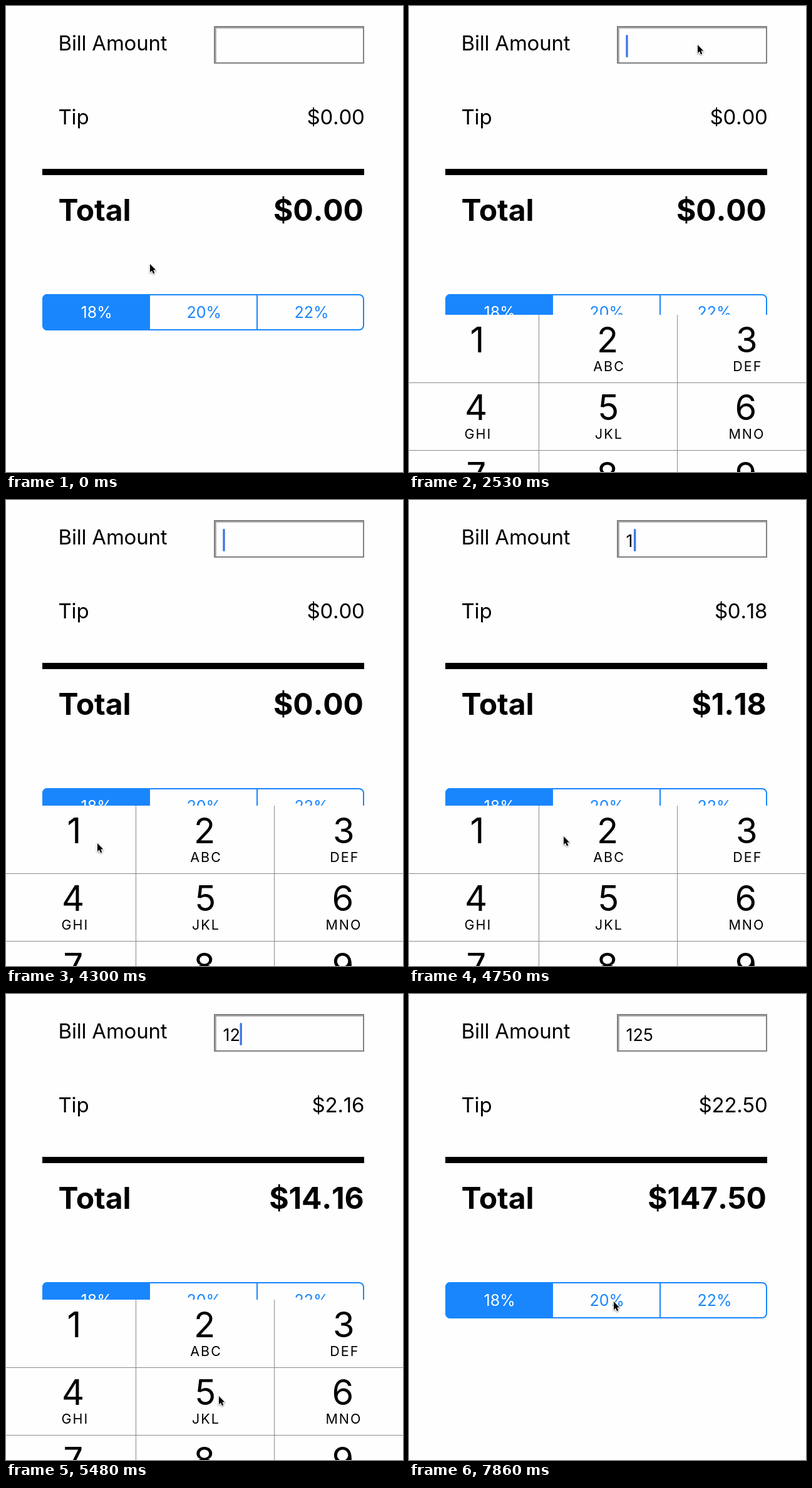
An HTML page with a canvas that plays this animation: 634x744 px, repeating every 8000 ms.

```html
<!DOCTYPE html>
<html lang="en">
<head>
<meta charset="utf-8">
<title>Tip calculator</title>
<style>
html, body { margin: 0; width: 100%; height: 100%; overflow: hidden; background: #fefefe; }
canvas { display: block; width: 634px; height: 744px; }
</style>
</head>
<body>
<canvas id="stage" width="634" height="744"></canvas>
<script>
const ctx = document.getElementById('stage').getContext('2d');
const W = 634, H = 744, LOOP = 8000, TICK = 148.3;
const BLUE = '#1986fe', PAPER = '#fefefe';
const KEY_TOP = 488, KEY_H = 108, PAD_H = 432;
const COLS = [0, 208, 429, W];

// Pointer waypoints: tick, x, y
const PATH = [
  [0, 230, 412], [2, 232, 411], [4, 232, 411], [9, 443, 68], [14, 443, 68],
  [15, 461, 62], [18, 461, 62], [20, 310, 580], [21, 310, 580], [23, 250, 591],
  [26, 146, 555], [27, 146, 555], [28, 146, 548], [31, 146, 548], [33, 347, 526],
  [34, 347, 526], [35, 340, 609], [37, 340, 642], [40, 340, 642], [41, 335, 490],
  [43, 350, 403], [48, 350, 403], [53, 327, 491]
];
const TYPED = [[39, '125'], [34, '12'], [31, '1'], [0, '']];
const PRESSED = { 30: 1, 33: 2, 38: 5 };
const CARET_ON = [[15, 19], [22, 25], [28, 42]];
const CARET_X = [346.3, 359, 373.5, 390.6];

// Digit and its centre, letters and their centre
const KEYS = [
  ['1', 107.5], ['2', 317.5, 'ABC', 318.2], ['3', 539.5, 'DEF', 540],
  ['4', 107, 'GHI', 109], ['5', 318.5, 'JKL', 318.8], ['6', 538, 'MNO', 538.7],
  ['7', 107], ['8', 317], ['9', 538]
];

function rect(x, y, w, h, color) {
  ctx.fillStyle = color;
  ctx.fillRect(x, y, w, h);
}

// Places text by its inked edges: side 0 = left, 0.5 = centre, 1 = right
function text(str, x, y, size, { side = 0, weight = 400, gap = 0, color = '#000', kern = 'normal' } = {}) {
  ctx.font = `${weight} ${size}px Inter, "Open Sans", sans-serif`;
  ctx.letterSpacing = gap + 'px';
  ctx.fontKerning = kern;
  ctx.fillStyle = color;
  const m = ctx.measureText(str);
  const left = -m.actualBoundingBoxLeft, right = m.actualBoundingBoxRight;
  ctx.fillText(str, x - left - (right - left) * side, y);
}

function money(amount, x, y, size, weight) {
  text('$' + amount.toFixed(2), x, y, size, { side: 1, weight, gap: -0.2, kern: 'none' });
}

function pointerAt(k) {
  const i = Math.max(1, PATH.findIndex(p => p[0] >= k));
  const [t0, x0, y0] = PATH[i - 1], [t1, x1, y1] = PATH[i];
  const u = (k - t0) / (t1 - t0), e = u * u * (3 - 2 * u);
  return [x0 + (x1 - x0) * e, y0 + (y1 - y0) * e];
}

// Remaining distance of a critically damped spring
function spring(sec) {
  const u = 18.26 * Math.max(0, sec);
  return (1 + u) * Math.exp(-u);
}

function padTop(k) {
  const sec = k * TICK / 1000;
  const hidden = sec < 6.6 ? spring(sec - 2.165) : 1 - spring(sec - 6.6);
  return Math.round(KEY_TOP + PAD_H * hidden);
}

function drawForm(k, value) {
  const bill = Number(value), tip = bill * 0.18;
  text('Bill Amount', 85.5, 71, 33, { gap: -0.2 });
  text('Tip', 84.5, 189, 33, { gap: -0.2 });
  money(tip, 571, 189, 33, 400);

  rect(332, 32, 240, 60, '#808080');
  rect(334, 34, 236, 56, '#acacac');
  rect(336, 36, 234, 54, PAPER);
  text(value, 347.5, 75, 27);
  if (k < 45 && CARET_ON.some(([a, b]) => k >= a && k < b)) {
    ctx.fillStyle = '#4178e6';
    ctx.beginPath();
    ctx.roundRect(CARET_X[value.length], 46, 3.4, 36, 1.5);
    ctx.fill();
  }

  rect(58, 260, 514, 10, '#000');
  text('Total', 84.5, 343, 48, { weight: 700, gap: -0.1 });
  money(bill + tip, 569.5, 343, 48, 700);
}

function drawSegments() {
  ctx.save();
  ctx.beginPath();
  ctx.roundRect(58, 460, 514, 58, 8);
  ctx.clip();
  rect(58, 460, 172, 58, BLUE);
  rect(400, 460, 2, 58, BLUE);
  ctx.restore();
  ctx.strokeStyle = BLUE;
  ctx.lineWidth = 2;
  ctx.beginPath();
  ctx.roundRect(59, 461, 512, 56, 7);
  ctx.stroke();
  ['18%', '20%', '22%'].forEach((s, i) =>
    text(s, 143.9 + i * 171.7, 498, 25, { side: 0.5, color: i ? BLUE : '#fff' }));
}

function drawPad(k) {
  const top = padTop(k);
  if (top >= H) return;
  rect(0, top, W, H - top, PAPER);
  const down = PRESSED[k];
  if (down) {
    const c = (down - 1) % 3, r = Math.floor((down - 1) / 3);
    rect(COLS[c], top + r * KEY_H, COLS[c + 1] - COLS[c] - 1, KEY_H, '#d0d4da');
  }
  const line = '#8c8c8c';
  rect(207, top, 1, H - top, line);
  rect(428, top, 1, H - top, line);
  rect(0, top + KEY_H, W, 1, line);
  rect(0, top + 2 * KEY_H, W, 1, line);
  KEYS.forEach(([digit, x, letters, lx], i) => {
    const y = top + Math.floor(i / 3) * KEY_H;
    text(digit, x, y + 60, 56, { side: 0.5 });
    if (letters) text(letters, lx, y + 90, 21.5, { side: 0.5, gap: 2 });
  });
}

function drawPointer(k) {
  const [x, y] = pointerAt(k);
  const arrow = new Path2D('M0 0V13.2L3 10.5L5 15.2L7.3 14.2L5.3 9.6H9.2Z');
  ctx.save();
  ctx.translate(Math.round(x), Math.round(y));
  ctx.lineJoin = 'round';
  ctx.lineWidth = 2;
  ctx.strokeStyle = '#fff';
  ctx.shadowColor = 'rgba(0,0,0,.45)';
  ctx.shadowBlur = 2.5;
  ctx.shadowOffsetY = 1;
  ctx.stroke(arrow);
  ctx.shadowColor = 'transparent';
  ctx.fillStyle = '#000';
  ctx.fill(arrow);
  ctx.restore();
}

function draw(ms) {
  const k = Math.min(53, Math.floor((ms + 8) / TICK));
  const value = TYPED.find(([at]) => k >= at)[1];
  rect(0, 0, W, H, PAPER);
  drawForm(k, value);
  drawSegments();
  drawPad(k);
  drawPointer(k);
}

const start = performance.now();
function loop() {
  draw((performance.now() - start) % LOOP);
  requestAnimationFrame(loop);
}
loop();
</script>
</body>
</html>
```
